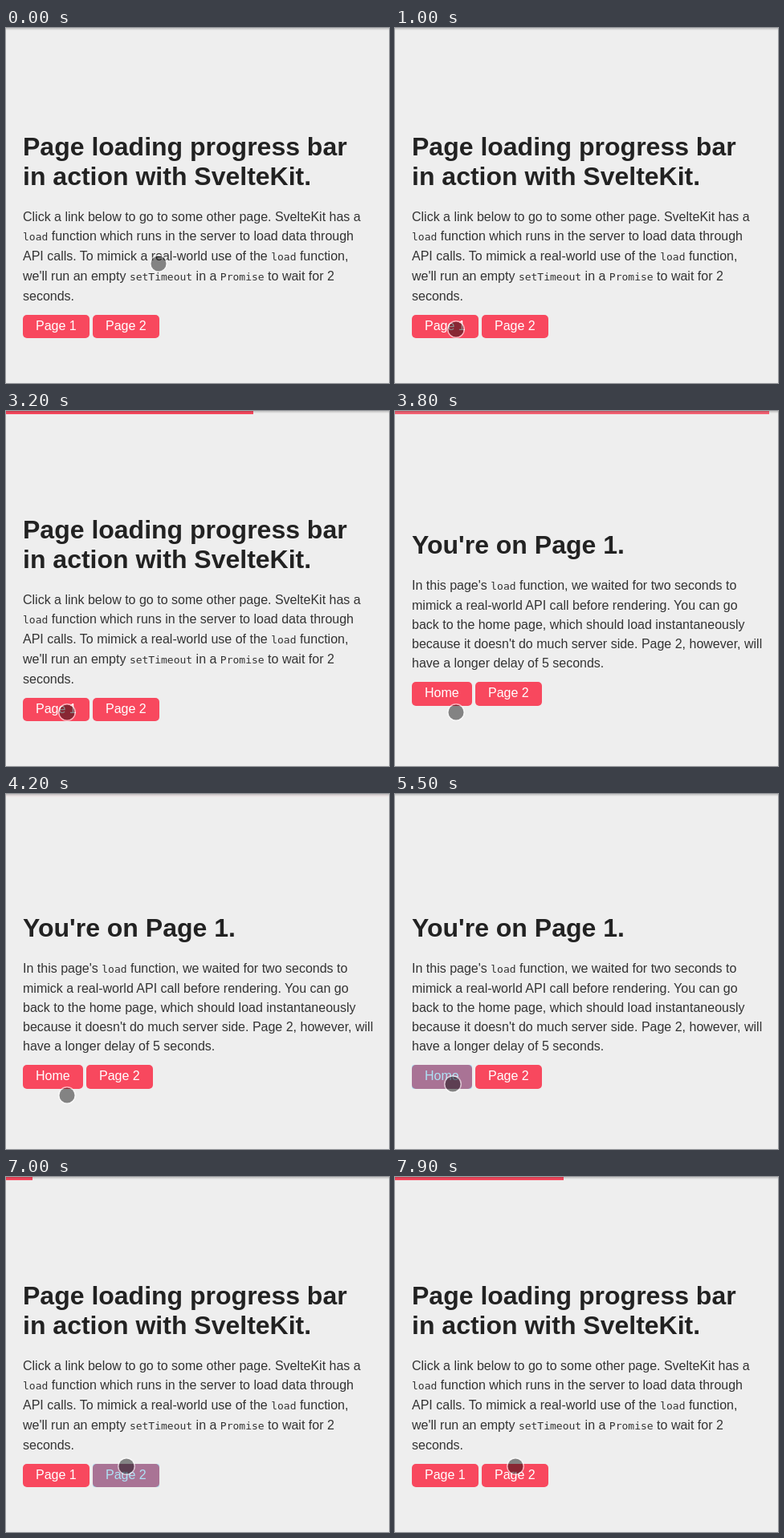
These frames come from a looping animation (477x443 px, 8 s). An HTML page:

```html
<!DOCTYPE html>
<html lang="en">
<head>
<meta charset="utf-8">
<title>Page loading progress bar</title>
<style>
  html, body { margin: 0; width: 100%; height: 100%; overflow: hidden; background: #eee; }
  body { position: relative; font: 16px "Liberation Sans", Arial, sans-serif; color: #333; }
  div { position: absolute; }
  /* The strut puts the baseline exactly 40px below the top of the line */
  .line { left: 21px; line-height: 0; white-space: pre; }
  .line::before { content: ""; display: inline-block; height: 40px; }
  .title { font-size: 32px; font-weight: bold; color: #222; }
  .label { color: #fff; }
  code { font: 13px/0 "DejaVu Sans Mono", monospace; }
  .button { border-radius: 5px; background: #f8485e; }
  .tap { border-radius: 3px; background: #33b5e5; opacity: 0; }
  #bar { left: 0; top: 0; height: 4px; background: #f8485e; }
  #shade { left: 0; top: 0; width: 100%; height: 3px; background: linear-gradient(#0003, #0000); }
  #cursor {
    left: -9.5px; top: -9.5px; width: 19px; height: 19px; border-radius: 50%;
    background: rgba(0, 0, 0, .45); box-shadow: 0 0 0 1.5px rgba(255, 255, 255, .6);
  }
</style>
</head>
<body>
<div id="home"></div>
<div id="page1"></div>
<div id="bar"></div>
<div id="shade"></div>
<div id="cursor"></div>
<script>
const $ = id => document.getElementById(id);
const clamp = v => Math.min(1, Math.max(0, v));
const LOOP = 8000, STEP = 100, WIDTH = 477;

const line = (x, baseline, s, cls = "") =>
  `<div class="line ${cls}" style="left:${x}px;top:${baseline - 40}px">` +
  s.replace(/`(.+?)`/g, "<code>$1</code>") + "</div>";

const lines = (first, gap, rows, cls) =>
  rows.map((s, i) => line(21, Math.floor(first + gap * i), s, cls)).join("");

// A button with a blue tap highlight on top
function button(x, y, w, h, label, id) {
  const box = `style="left:${x}px;top:${y}px;width:${w}px;height:${h}px"`;
  return `<div class="button" ${box}></div>` + line(x + 16, y + 19, label, "label") +
    `<div class="tap" id="${id}" ${box}></div>`;
}

$("home").innerHTML =
  lines(159, 37, ["Page loading progress bar", "in action with SvelteKit."], "title") +
  lines(241, 24.75, [
    "Click a link below to go to some other page. SvelteKit has a",
    "`load` function which runs in the server to load data through",
    "API calls. To mimick a real-world use of the `load` function,",
    "we'll run an empty `setTimeout` in a `Promise` to wait for 2",
    "seconds."]) +
  button(21, 358, 83, 29, "Page 1", "tapOne") +
  button(108, 358, 83, 29, "Page 2", "tapTwo");

$("page1").innerHTML =
  lines(178, 37, ["You're on Page 1."], "title") +
  lines(223.9, 24.2, [
    "In this page's `load` function, we waited for two seconds to",
    "mimick a real-world API call before rendering. You can go",
    "back to the home page, which should load instantaneously",
    "because it doesn't do much server side. Page 2, however, will",
    "have a longer delay of 5 seconds."]) +
  button(21, 338, 75, 30, "Home", "tapHome") +
  button(100, 338, 83, 30, "Page 2", "tapOther");

const loads = [
  { id: "tapOne", tap: 1200, start: 1230, done: 3350 },
  { id: "tapHome", tap: 5500, start: 5630, done: 5630 },
  { id: "tapTwo", tap: 7000, start: 6880, done: Infinity }
];

// Each move goes to x, y between two times
const moves = [
  { from: 100, to: 200, x: 188, y: 293 },
  { from: 400, to: 500, x: 181, y: 303.5 },
  { from: 700, to: 800, x: 73, y: 377 },
  { from: 900, to: 1000, x: 75.5, y: 375.5 },
  { from: 4700, to: 5200, x: 71.5, y: 361.5 },
  { from: 5700, to: 6100, x: 147.5, y: 384.5 },
  { from: 6200, to: 6500, x: 149.5, y: 360.5 }
];

function cursorAt(t) {
  let x = 189.5, y = 293.5;
  for (const m of moves) {
    const p = clamp((t - m.from) / (m.to - m.from));
    x += (m.x - x) * p;
    y += (m.y - y) * p;
  }
  return [x, y];
}

// The bar creeps towards a limit while loading, then rushes to the end and fades
const creep = ms => 412 * (1 - Math.exp(-.7 * Math.max(0, ms) / 1000));

function barAt(t) {
  const load = loads.findLast(l => t >= Math.max(l.tap, l.start));
  if (!load) return [0, 1];
  if (t < load.done) return [creep(t - load.start), 1];
  const since = (t - load.done) / 1000;
  const gap = WIDTH - creep(load.done - load.start);
  return [WIDTH - gap * Math.exp(-6 * since), clamp((.87 - since) / .5)];
}

function draw(now) {
  const t = Math.floor(now % LOOP / STEP) * STEP;
  const onPage1 = t >= loads[0].done && t < loads[1].done;
  $("home").style.display = onPage1 ? "none" : "";
  $("page1").style.display = onPage1 ? "" : "none";

  const [x, y] = cursorAt(t);
  $("cursor").style.transform = `translate(${x}px, ${y}px)`;

  const [width, opacity] = barAt(t);
  $("bar").style.width = width + "px";
  $("bar").style.opacity = opacity;

  for (const { id, tap } of loads)
    $(id).style.opacity = t >= tap && t < tap + 200 ? .4 : 0;
  requestAnimationFrame(draw);
}
requestAnimationFrame(draw);
</script>
</body>
</html>
```
